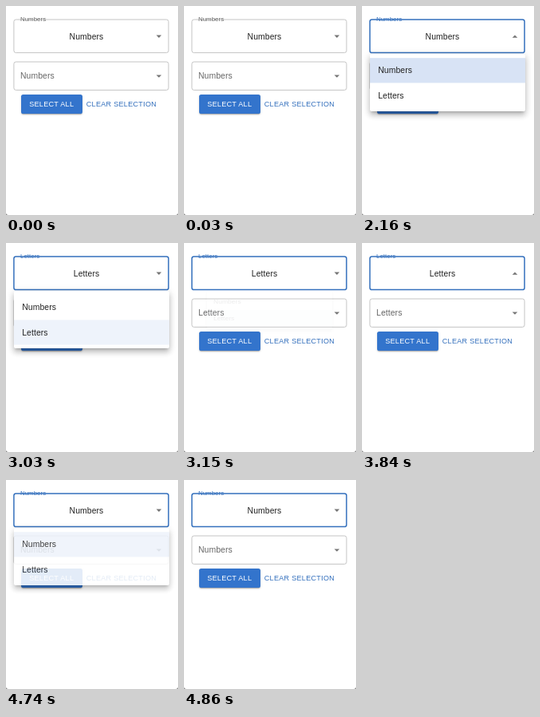
Recreate the animation shown at these times as an HTML page. Size 216 by 262 pixels, loop 8000 ms.

```html
<!DOCTYPE html>
<html lang="en">
<head>
<meta charset="utf-8">
<title>Linked selects</title>
<style>
  html, body { margin: 0; width: 100%; height: 100%; overflow: hidden; background: #777; }
  #stage {
    position: relative; width: 216px; height: 262px; overflow: hidden;
    background: #fff; border-radius: 0 0 3px 3px;
  }
  svg { position: absolute; left: 0; top: 0; overflow: visible; }
  text { font: 10.4px "Liberation Sans", Arial, Helvetica, sans-serif; letter-spacing: .1px; fill: #212121; }
  .box { fill: none; stroke: #c4c4c4; stroke-width: 1; }
  .box.focus { stroke: #3470bd; stroke-width: 1.5; }
  .arrow { fill: #757575; }
  .btn { font-size: 9.1px; letter-spacing: .26px; }
  #label { font-size: 7.8px; letter-spacing: .07px; }
  #button {
    position: absolute; left: 19px; top: 111px; width: 77px; height: 23.7px;
    border-radius: 2.6px; background: #3374cc;
    box-shadow: 0 2px .7px -1.3px rgba(0,0,0,.2), 0 1.3px 1.3px rgba(0,0,0,.14), 0 .7px 3.3px rgba(0,0,0,.12);
  }
  #menu {
    position: absolute; left: 9.5px; top: 59.6px; width: 195px; height: 72.8px;
    border-radius: 2.6px; background: #fff; transform-origin: 50% 0;
    box-shadow: 0 3.3px 3.3px -2px rgba(0,0,0,.2), 0 5.2px 6.5px .7px rgba(0,0,0,.14), 0 2px 9.1px 1.3px rgba(0,0,0,.12);
  }
</style>
</head>
<body>
<div id="stage">
  <div id="button"></div>
  <svg width="216" height="262">
    <rect class="box" id="outline" x="9.9" y="17" width="194.2" height="41.6" rx="2.6"/>
    <text id="label" x="18" y="18.9"></text>
    <text id="value" x="101" y="41.8" text-anchor="middle"></text>
    <path class="arrow" id="arrow" d="M-3.3 -1.6H3.3L0 1.7Z"/>

    <rect class="box" x="9.9" y="70" width="194.2" height="35.4" rx="2.6"/>
    <text id="second" x="18" y="91.2" style="fill:#666"></text>
    <path class="arrow" d="M-3.3 -1.6H3.3L0 1.7Z" transform="translate(192 88)"/>

    <text class="btn" x="29.2" y="126.2" style="fill:#fff">SELECT ALL</text>
    <text class="btn" x="100.8" y="126.2" style="fill:#3470bd">CLEAR SELECTION</text>
  </svg>
  <div id="menu">
    <svg width="195" height="73">
      <rect id="row0" y="5.2" width="195" height="31.2"/>
      <rect id="row1" y="36.4" width="195" height="31.2"/>
      <text x="10.2" y="24.4">Numbers</text>
      <text x="10.2" y="55.6">Letters</text>
    </svg>
  </div>
</div>
<script>
const LOOP = 8000, TICK = 30;
const NAMES = ["Numbers", "Letters"];
// opening and closing of the menu: start, end, choice made on closing
const VISITS = [
  { open: 1980, opened: 2160, close: 3030, closed: 3210, pick: 1, tint: "#d8e3f5" },
  { open: 3870, opened: 4050, close: 4710, closed: 4860, pick: 0, tint: "#eef3fb", press: 3840 }
];
const LIGHT = "#eef3fb", GREY = [102, 102, 102], BLUE = [52, 112, 189];
const $ = id => document.getElementById(id);
const clamp = v => Math.min(1, Math.max(0, v));
const span = (t, a, b) => clamp((t - a) / (b - a));

// cubic-bezier(.4, 0, .2, 1)
function ease(x) {
  let lo = 0, hi = 1;
  for (let i = 0; i < 18; i++) {
    const s = (lo + hi) / 2, r = 1 - s;
    if (1.2 * r * r * s + .6 * r * s * s + s ** 3 < x) lo = s; else hi = s;
  }
  return 3 * (1 - lo) * lo * lo + lo ** 3;
}

function draw(t) {
  let choice = 0, up = false, fade = 0, grow = 0, tint = LIGHT;
  for (const v of VISITS) {
    if (t < (v.press || v.open)) continue;
    if (t < v.close) {
      up = true;
      tint = v.tint;
      fade = ease(span(t, v.open, v.opened));
      grow = ease(span(t, v.open, v.open + (v.opened - v.open) * .8));
    } else {
      choice = v.pick;
      tint = LIGHT;
      fade = 1 - ease(span(t, v.close, v.closed));
      grow = 1 - ease(span(t, v.close + (v.closed - v.close) * .333, v.closed));
    }
  }
  for (const id of ["label", "value", "second"]) $(id).textContent = NAMES[choice];

  const first = VISITS[0];
  const c = ease(span(t, first.open, first.opened));
  $("label").style.fill = `rgb(${GREY.map((g, i) => g + (BLUE[i] - g) * c)})`;
  $("outline").classList.toggle("focus", t >= first.open);
  $("arrow").setAttribute("transform", `translate(192 38.2) scale(1 ${up ? -1 : 1})`);

  NAMES.forEach((_, i) => $("row" + i).style.fill = i === choice ? tint : "none");
  const menu = $("menu").style;
  menu.visibility = fade > .002 ? "visible" : "hidden";
  menu.opacity = fade;
  menu.transform = `scale(${.75 + .25 * grow}, ${.5625 + .4375 * grow})`;
}

const start = performance.now();
function frame() {
  const t = (performance.now() - start) % LOOP;
  draw(Math.floor(t / TICK) * TICK);
  requestAnimationFrame(frame);
}
frame();
</script>
</body>
</html>
```
